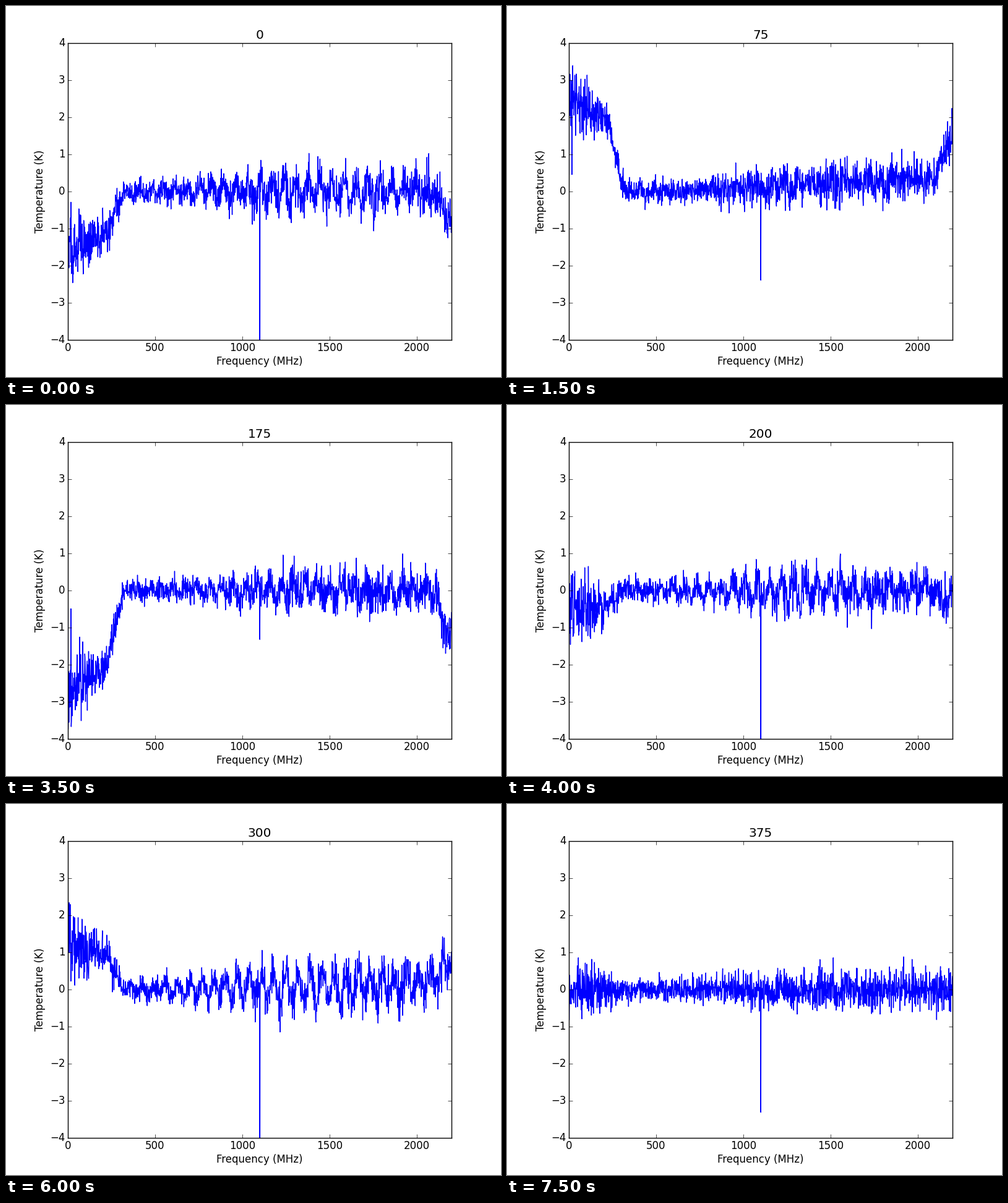
Recreate the animation shown at these times as a matplotlib script. Size 800 by 600 pixels, loop 8000 ms.

```python
import numpy as np
import matplotlib.pyplot as plt
from matplotlib.animation import FuncAnimation

plt.style.use("classic")
plt.rcParams.update({
    "font.family": "DejaVu Sans",
    "figure.facecolor": "white",
    "savefig.facecolor": "white",
    "figure.dpi": 100,
    "savefig.dpi": 100,
    "xtick.major.pad": 3.2,
    "ytick.major.pad": 3.2,
})

FRAMES = 16
STEP = 25          # integrations between two plots
CHANNELS = 1500
F_MAX = 2200
JOIN = 1100        # where the two halves of the band meet
PERIOD = 69        # of the standing wave, in MHz

# Drift of the band edges and strength of the standing wave
KEYS = [0, 3, 5, 7, 10, 13, 15]
DRIFT = [-1.7, 2.7, 3.7, -2.9, 4.0, 0, 0]
WAVE = [0.3, 0.1, 0.5, 0.22, 0.45, 0.38, 0.06]

# Level of the single channel at the join
SPIKE = [-9, -1.2, -1.3, -2.39, -9, -9, -3, -1.32,
         -9, -2.9, 9, 1.2, -9, 0.3, -3.7, -3.31]

freq = np.linspace(0, F_MAX, CHANNELS)


def smooth(x, start, end):
    t = np.clip((x - start) / (end - start), 0, 1)
    return t * t * (3 - 2 * t)


def channel(f):
    return round(f / F_MAX * (CHANNELS - 1))


low_edge = (0.68 + 0.34 * np.exp(-freq / 100)) * (1 - smooth(freq, 205, 335))
high_edge = 0.42 * smooth(freq, 2075, 2200)
tilt = 0.12 * smooth(freq, 400, 2200)
wave_shape = np.interp(freq, [300, 1240, F_MAX], [0.2, 1, 0.6])
sigma = 0.16 + 0.26 * (1 - smooth(freq, 50, 340)) + 0.13 * smooth(freq, 600, 1300)


def spectrum(n):
    rng = np.random.default_rng(100 + n)
    drift = np.interp(n, KEYS, DRIFT)
    crest = 1240 - 22 * np.sin(n)
    wave = np.interp(n, KEYS, WAVE) * np.cos(2 * np.pi * (freq - crest) / PERIOD)
    noise = np.clip(rng.standard_normal(CHANNELS), -2.9, 2.9)

    y = drift * (low_edge + high_edge) + max(drift, 0) * tilt
    y += wave_shape * wave + sigma * noise
    y[0] = y[channel(18)] = 0.17 * drift
    y[channel(JOIN)] = SPIKE[n]
    return y


fig, ax = plt.subplots(figsize=(8, 6))
line, = ax.plot(freq, spectrum(0), "b-")
ax.set_xlim(0, F_MAX)
ax.set_ylim(-4, 4)
ax.set_xlabel("Frequency (MHz)", va="baseline")
ax.set_ylabel("Temperature (K)", va="baseline")
ax.xaxis.set_label_coords(0.5125, 20 / 600, transform=fig.transFigure)
ax.yaxis.set_label_coords(60 / 800, 0.5, transform=fig.transFigure)
title = ax.set_title("0")


def update(n):
    line.set_ydata(spectrum(n))
    title.set_text(str(n * STEP))
    return line, title


anim = FuncAnimation(fig, update, frames=FRAMES, interval=500,
                     repeat=True, repeat_delay=0, blit=False)
plt.show()
```
